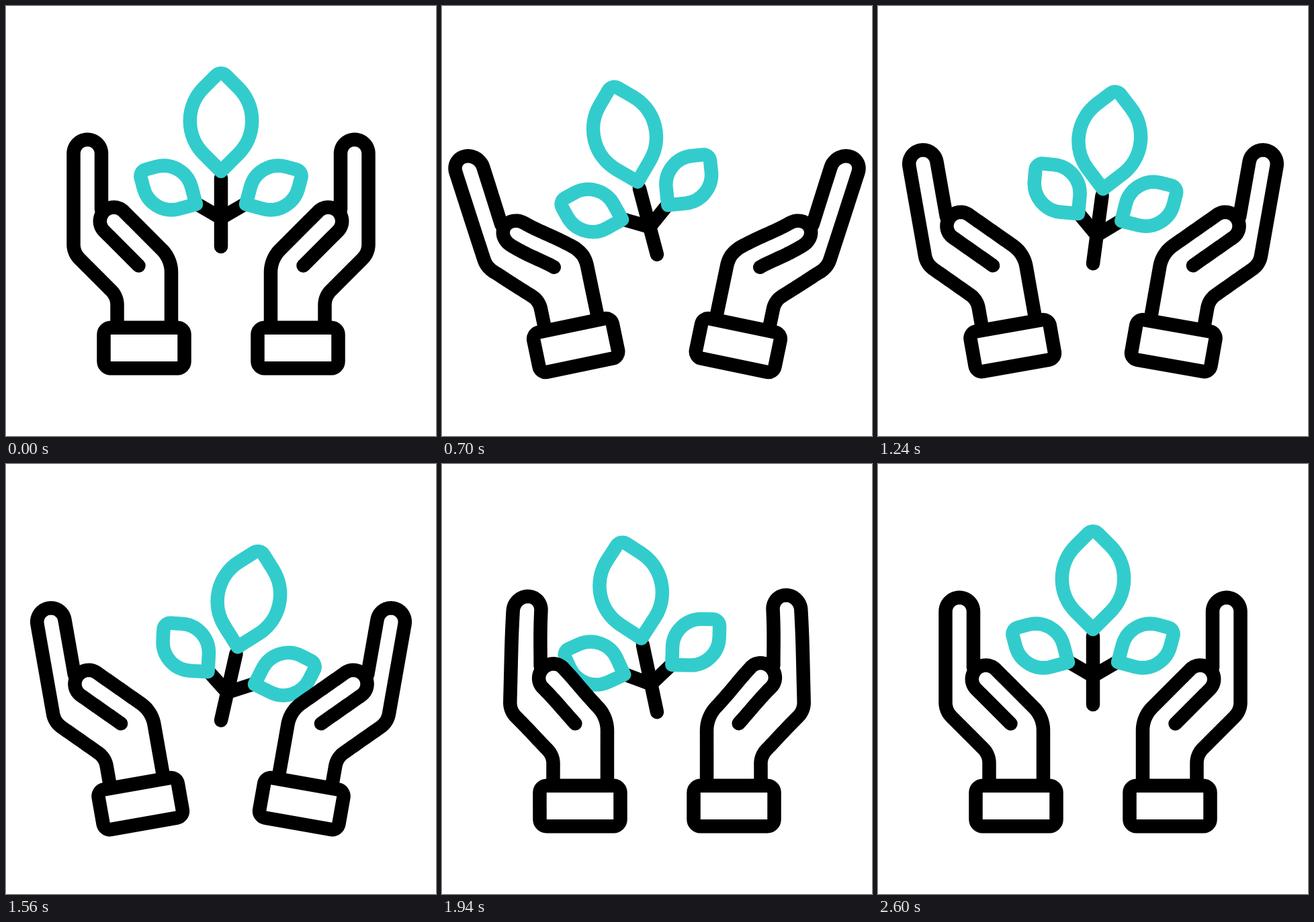
An HTML page that plays this animation: 640x640 px, repeating every 3000 ms.

```html
<!DOCTYPE html>
<html lang="en">
<head>
<meta charset="utf-8">
<title>Hands and sprout</title>
<style>
html, body { margin: 0; width: 100%; height: 100%; overflow: hidden; background: #fff; }
svg { display: block; width: 100%; height: 100%; }
</style>
</head>
<body>
<svg id="stage" viewBox="0 0 640 640" fill="none" stroke="#000" stroke-width="20.5" stroke-linecap="round" stroke-linejoin="round"></svg>
<script>
const stage = document.getElementById('stage');
const LOOP = 3000, STEP = 20, TEAL = '#33cccc';

function add(parent, tag, attrs = {}) {
  const el = document.createElementNS('http://www.w3.org/2000/svg', tag);
  for (const k in attrs) el.setAttribute(k, attrs[k]);
  return parent.appendChild(el);
}

// Pointed leaf along the vertical axis: rounded tip on top, sharp base below.
function leafPath(tip, r) {
  const along = r * Math.SQRT1_2, side = tip - along, c = 7.25;
  const top = -tip + c;
  return `M0 ${tip}L${side} ${along}A${r} ${r} 0 0 0 ${side} ${-along}` +
    `L${c} ${top}A10.25 10.25 0 0 0 ${-c} ${top}` +
    `L${-side} ${-along}A${r} ${r} 0 0 0 ${-side} ${along}Z`;
}

// Plant, with its origin at the foot of the stem
const plant = add(stage, 'g');
add(plant, 'path', { d: 'M0 0V-102' });
function sideLeaf(dir) {
  const g = add(plant, 'g');
  add(g, 'path', { d: `M0 -42.5L${dir * 36} -63.3` });
  add(g, 'path', {
    d: leafPath(49, 43), stroke: TEAL,
    transform: `translate(${dir * 79.5} -87.5) rotate(${dir * 60})`
  });
  return g;
}
const leftLeaf = sideLeaf(-1), rightLeaf = sideLeaf(1);
add(plant, 'path', { d: leafPath(75, 69.6), stroke: TEAL, transform: 'translate(0 -187)' });

// Hands
const FINGER = 'M165.5 476V444.8A30 30 0 0 0 156.7 423.6L109.3 376.2A30 30 0 0 1 100.5 355' +
  'V219.5A20.75 20.75 0 0 1 142 219.5V303';
const THUMB = 'M197.5 386.5L146 335A20.5 20.5 0 0 1 175 305.5L232 362.5A48 48 0 0 1 246 396.5V476';

function sample(d) {
  const path = add(stage, 'path', { d }), len = path.getTotalLength();
  const n = Math.ceil(len / 3), pts = [];
  for (let i = 0; i <= n; i++) {
    const p = path.getPointAtLength(len * i / n);
    pts.push([p.x, p.y]);
  }
  path.remove();
  return pts;
}
const outlines = [FINGER, THUMB].map(sample);

function makeHand(mirrored) {
  const flip = add(stage, 'g', mirrored ? { transform: 'translate(640 0) scale(-1 1)' } : {});
  const g = add(flip, 'g');
  const lines = outlines.map(() => add(g, 'polyline', { fill: '#fff' }));
  add(g, 'rect', { x: 145.5, y: 478.75, width: 120, height: 60.5, rx: 10.25, fill: '#fff' });
  return { g, lines, extra: mirrored ? 1 : 0 };
}
const hands = [makeHand(false), makeHand(true)];

const bump = (d, width) => Math.exp(-d * d / (2 * width * width));

// Soft bend: the finger leans above the knuckle, the thumb moves around its tip,
// and the wrist sinks a little as the hand closes.
function bend([x, y], open, close, extra) {
  const s = Math.max(0, (380 - y) / 160), q = s * s;
  const thumb = bump(x - 163, 36) * bump(y - 320, 45), wrist = bump(y - 425, 21);
  const dx = open * -17.8 * s + close * (s + 10.5 * q + 9.5 * thumb);
  const dy = open * (s + 10 * thumb) +
    close * (3.5 * wrist - (3 + 3 * extra) * q - (4.5 + 2 * extra) * thumb);
  return (x + dx).toFixed(2) + ',' + (y + dy).toFixed(2);
}

// Eased keyframes: [time, value] pairs
function track(keys, t) {
  if (t <= keys[0][0]) return keys[0][1];
  for (let i = 1; i < keys.length; i++) {
    const [t0, a] = keys[i - 1], [t1, b] = keys[i];
    if (t < t1) {
      const p = (t - t0) / (t1 - t0);
      return a + (b - a) * p * p * (3 - 2 * p);
    }
  }
  return keys[keys.length - 1][1];
}

const motion = {
  drop: [[200, 0], [1240, 25.3], [1400, 25.3], [2400, 0]],
  sway: [[200, 0], [730, -15], [1475, 14.6], [2030, -14], [2400, 0]],
  foldL: [[200, 0], [640, 0.5], [1280, 12.8], [1720, 2], [2000, 2.4], [2260, 3.5], [2600, 0]],
  foldR: [[200, 0], [1100, 10.5], [1600, 0.6], [1850, 0.6], [2240, 8], [2600, 0]],
  tilt: [[200, 0], [670, -11.8], [1020, -10], [1720, -10], [2080, 5], [2600, 0]],
  open: [[200, 0], [670, 1], [1020, 0]],
  close: [[1720, 0], [2200, 1.06], [2600, 0]]
};

function draw(t) {
  const v = {};
  for (const k in motion) v[k] = track(motion[k], t);
  plant.setAttribute('transform', `translate(320 ${358 + v.drop}) rotate(${v.sway})`);
  leftLeaf.setAttribute('transform', `rotate(${v.foldL} 0 -42.5)`);
  rightLeaf.setAttribute('transform', `rotate(${-v.foldR} 0 -42.5)`);
  for (const h of hands) {
    h.g.setAttribute('transform', `rotate(${v.tilt} 183 537.5)`);
    h.lines.forEach((line, i) => line.setAttribute('points',
      outlines[i].map(p => bend(p, v.open, v.close, h.extra)).join(' ')));
  }
}

const start = performance.now();
function tick() {
  const t = (performance.now() - start) % LOOP;
  draw(Math.floor(t / STEP) * STEP);
  requestAnimationFrame(tick);
}
tick();
</script>
</body>
</html>
```
